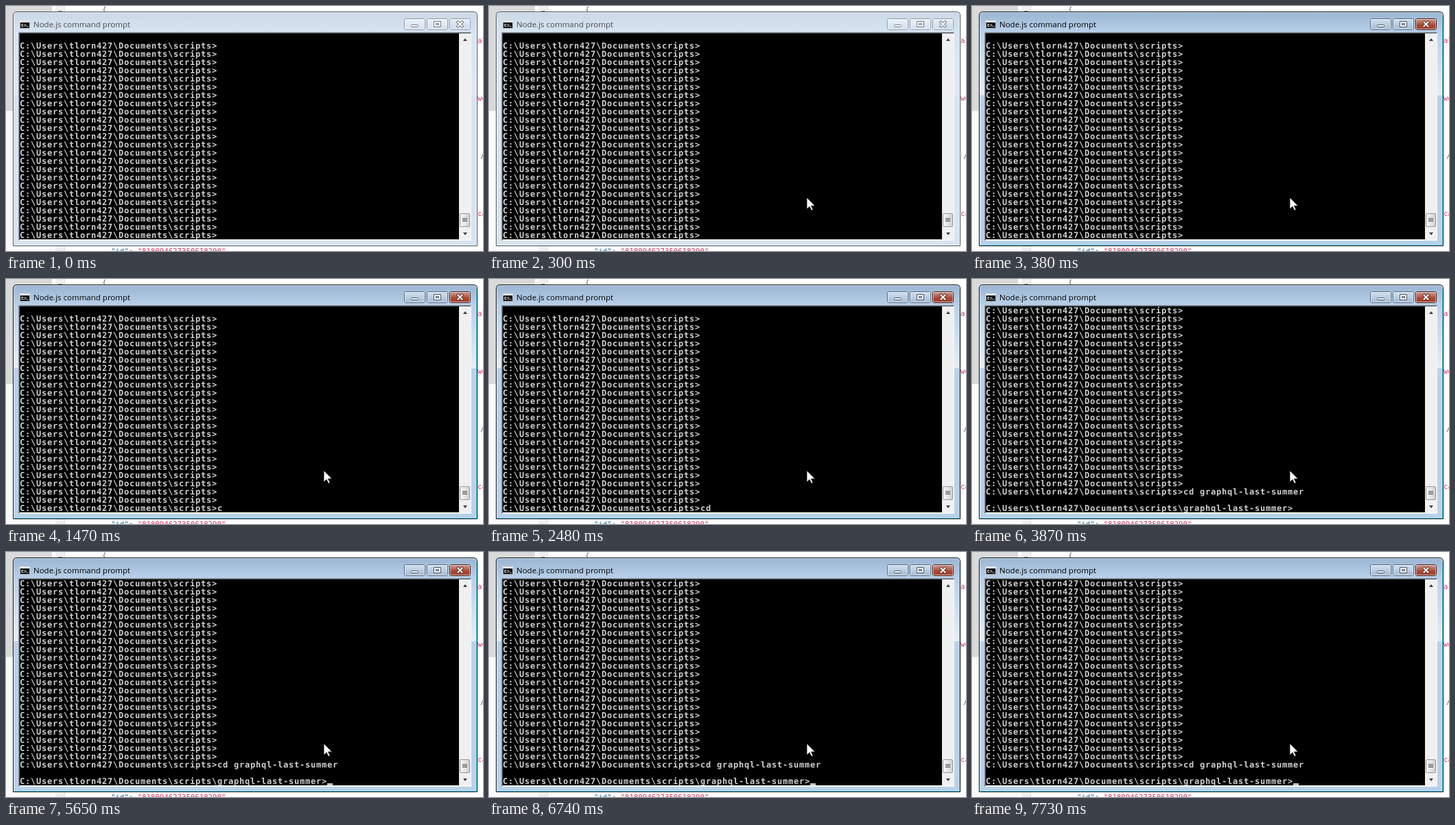
Animation of 695 by 357 pixels, one loop 8 s. Source, as an HTML page:

```html
<!DOCTYPE html>
<html lang="en">
<head>
<meta charset="utf-8">
<title>Command prompt</title>
<style>
  html, body { margin: 0; width: 100%; height: 100%; overflow: hidden; background: #fff; }
  svg { display: block; width: 695px; height: 357px; }
  text { white-space: pre; }

  .code { font: 10.7px "DejaVu Sans Mono", monospace; }
  .key { fill: #2a6a94; }
  .str { fill: #d0365f; }
  .dim { fill: #666; }

  .win { --edge: #50565d; --top: #cbd8e6; --face: #d7e4f2; --glow: #dfe9f4; --ink: #4c4c4c;
         --rim: #eef4fa; --btn1: #eaf1f8; --btn2: #d3e0ee; --btnEdge: #8f9aa8; --glyph: #74797f;
         --close1: #eaf1f8; --close2: #d3e0ee; --closeEdge: #8f9aa8; --x: #74797f; }
  .win.active { --edge: #10161d; --top: #9bb6d3; --face: #b9d1ea; --glow: #e4eef8; --ink: #000;
         --rim: #5fd3f5; --btn1: #d3e1f0; --btn2: #a3bad4; --btnEdge: #566a80; --glyph: #4b5561;
         --close1: #d3a197; --close2: #a8452f; --closeEdge: #4a2020; --x: #5c322e; }
  .frame { fill: url(#frame); stroke: var(--edge); }
  .title { font: 11.5px "Open Sans", sans-serif; fill: var(--ink); }
  .btn { fill: url(#btn); stroke: var(--btnEdge); }
  .btn.close { fill: url(#close); stroke: var(--closeEdge); }
  .shine { fill: none; stroke: #fff; stroke-opacity: .55; }
  .rim { fill: none; stroke: var(--rim); }
  .glyph { fill: #fff; stroke: var(--glyph); }
  .cross { fill: none; stroke-linecap: square; }

  #rows text {
    font: bold 12px "DejaVu Sans Mono", monospace;
    letter-spacing: .776px;
    text-rendering: geometricPrecision;
    fill: #d2d2d2;
  }
</style>
</head>
<body>
<svg viewBox="0 0 695 357">
  <rect width="695" height="357" fill="#fff"/>
  <rect width="67" height="357" fill="#fafafa"/>
  <rect width="67" height="153" fill="#d9d9d9"/>
  <rect x="72" width="13" height="357" fill="#efefef"/>
  <path d="M85.5 0V357" stroke="#ddd"/>
  <path d="M76 7h6l-3 4z" fill="#777"/>
  <g class="code">
    <text x="140" y="9" class="dim">{</text>
    <text x="153" y="361"><tspan class="key">"id"</tspan><tspan class="dim">: </tspan><tspan class="str">"818094627350618290"</tspan></text>
    <text x="687" y="54" class="str">al</text>
    <text x="687" y="138" class="str">we</text>
    <text x="691" y="222" class="dim">/</text>
    <text x="687" y="306" class="str">ca</text>
  </g>

  <g class="win" id="win">
    <defs>
      <linearGradient id="frame" gradientUnits="userSpaceOnUse" x2="0" y1="9" y2="130">
        <stop style="stop-color:var(--top)"/>
        <stop offset=".25" style="stop-color:var(--face)"/>
        <stop offset="1" style="stop-color:var(--glow)"/>
        <stop offset="1" style="stop-color:var(--face)"/>
      </linearGradient>
      <linearGradient id="btn" x2="0" y2="1">
        <stop style="stop-color:var(--btn1)"/><stop offset="1" style="stop-color:var(--btn2)"/>
      </linearGradient>
      <linearGradient id="close" x2="0" y2="1">
        <stop style="stop-color:var(--close1)"/><stop offset=".6" style="stop-color:var(--close2)"/>
      </linearGradient>
      <linearGradient id="thumb" x2="1" y2="0">
        <stop stop-color="#f6f6f6"/><stop offset=".5" stop-color="#e6e6e6"/><stop offset="1" stop-color="#cfcfcf"/>
      </linearGradient>
    </defs>
    <path class="frame" d="M10.5 349.5V14Q10.5 8.5 16 8.5H681Q686.5 8.5 686.5 14V349.5z"/>
    <path class="shine" d="M11.5 348.5V14.5Q11.5 9.5 16.5 9.5H680.5Q685.5 9.5 685.5 14.5"/>
    <path class="rim" d="M12 348.5H685.5V16"/>

    <rect x="20.5" y="21.5" width="14" height="11" fill="#111" stroke="#b0b0b0"/>
    <path d="M20 22.5h15" stroke="#e4e4e4" stroke-width="3"/>
    <path d="M25 26.5h-2v3h2M26.5 27v1M26.5 29v1M28 26.5l1.5 3.5M31 30h1.5" fill="none" stroke="#fff"/>
    <text class="title" x="40" y="31">Node.js command prompt</text>

    <rect class="btn" x="580.5" y="18.5" width="30" height="16" rx="2.5"/>
    <rect class="btn" x="613.5" y="18.5" width="30" height="16" rx="2.5"/>
    <rect class="btn close" x="646.5" y="18.5" width="30" height="16" rx="2.5"/>
    <path class="shine" d="M581.5 19.5h28v14h-28zM614.5 19.5h28v14h-28zM647.5 19.5h28v14h-28z"/>
    <rect class="glyph" x="590.5" y="27.5" width="10" height="3" rx="1"/>
    <path class="glyph" fill-rule="evenodd" d="M623.5 22.5h10v8h-10zM626.5 25.5v2h4v-2z"/>
    <g class="cross">
      <path d="M658.5 23.5l6 6M664.5 23.5l-6 6" style="stroke:var(--x)" stroke-width="4"/>
      <path d="M658.5 23.5l6 6M664.5 23.5l-6 6" stroke="#fff" stroke-width="2"/>
    </g>

    <rect x="18" y="38" width="660" height="304" fill="#f4f7fa"/>
    <path d="M18.5 342V38.5H678" fill="none" stroke="#8c97a3"/>
    <path d="M19.5 341V39.5H677" fill="none" stroke="#555b62"/>
    <rect x="20" y="40" width="640" height="300" fill="#000"/>
    <rect x="660" y="40" width="17" height="300" fill="#f0f0f0"/>
    <path d="M666 51h6l-3 -4zM666 330h6l-3 4z" fill="#404040"/>
    <rect x="661.5" y="302.5" width="14" height="19" rx="1.5" fill="url(#thumb)" stroke="#979797"/>
    <path d="M665 309.5h7M665 311.5h7M665 313.5h7" stroke="#555"/>

    <g id="rows"></g>
    <rect id="caret" y="337" width="8" height="3" fill="#c4c4c4"/>
  </g>
  <path id="mouse" d="M0 0V17L4 13.2L6.8 19L9.2 18L6.5 12.2H12z" fill="#fff" stroke="#000" stroke-width=".8"/>
</svg>

<script>
  const LOOP = 8000, ROWS = 25, CELL = 8, LEFT = 20;
  const $ = id => document.getElementById(id);
  const dir = 'C:\\Users\\tlorn427\\Documents\\scripts';
  const prompt = dir + '>';
  const command = 'cd graphql-last-summer';
  const inner = dir + '\\graphql-last-summer>';

  // [start, characters typed]
  const typing = [[1470, 1], [1550, 2], [1700, 3], [2710, 4], [2860, 5], [3180, command.length]];
  // [caret on, caret off]
  const blinks = [[920, 1390], [1940, 2480], [3020, 3180], [4570, 5110], [5650, 6190], [6740, 7200], [7730, LOOP]];
  // [start, x, y]
  const moves = [[140, 489, 312], [220, 470, 288], [300, 463, 279]];
  const ENTER = 3870, FOCUS = 380;

  const lines = Array.from({ length: ROWS }, (_, i) => {
    const line = document.createElementNS('http://www.w3.org/2000/svg', 'text');
    line.setAttribute('x', LEFT);
    line.setAttribute('y', 50 + i * 12);
    $('rows').append(line);
    return line;
  });

  const latest = (list, t) => list.filter(item => item[0] <= t).pop();

  function screen(t) {
    const typed = command.slice(0, (latest(typing, t) || [0, 0])[1]);
    const rows = ['', ...Array(ROWS - 2).fill(prompt), prompt + typed];
    return t < ENTER ? rows : [...rows.slice(2), '', inner];
  }

  function draw(t) {
    const rows = screen(t);
    rows.forEach((row, i) => {
      if (lines[i].textContent !== row) lines[i].textContent = row;
    });
    $('caret').setAttribute('x', LEFT + rows[ROWS - 1].length * CELL);
    $('caret').style.display = blinks.some(([on, off]) => t >= on && t < off) ? '' : 'none';
    $('win').classList.toggle('active', t >= FOCUS);
    const move = latest(moves, t);
    $('mouse').style.display = move ? '' : 'none';
    if (move) $('mouse').setAttribute('transform', `translate(${move[1]} ${move[2]})`);
  }

  function tick() {
    draw(performance.now() % LOOP);
    requestAnimationFrame(tick);
  }
  tick();
</script>
</body>
</html>
```
